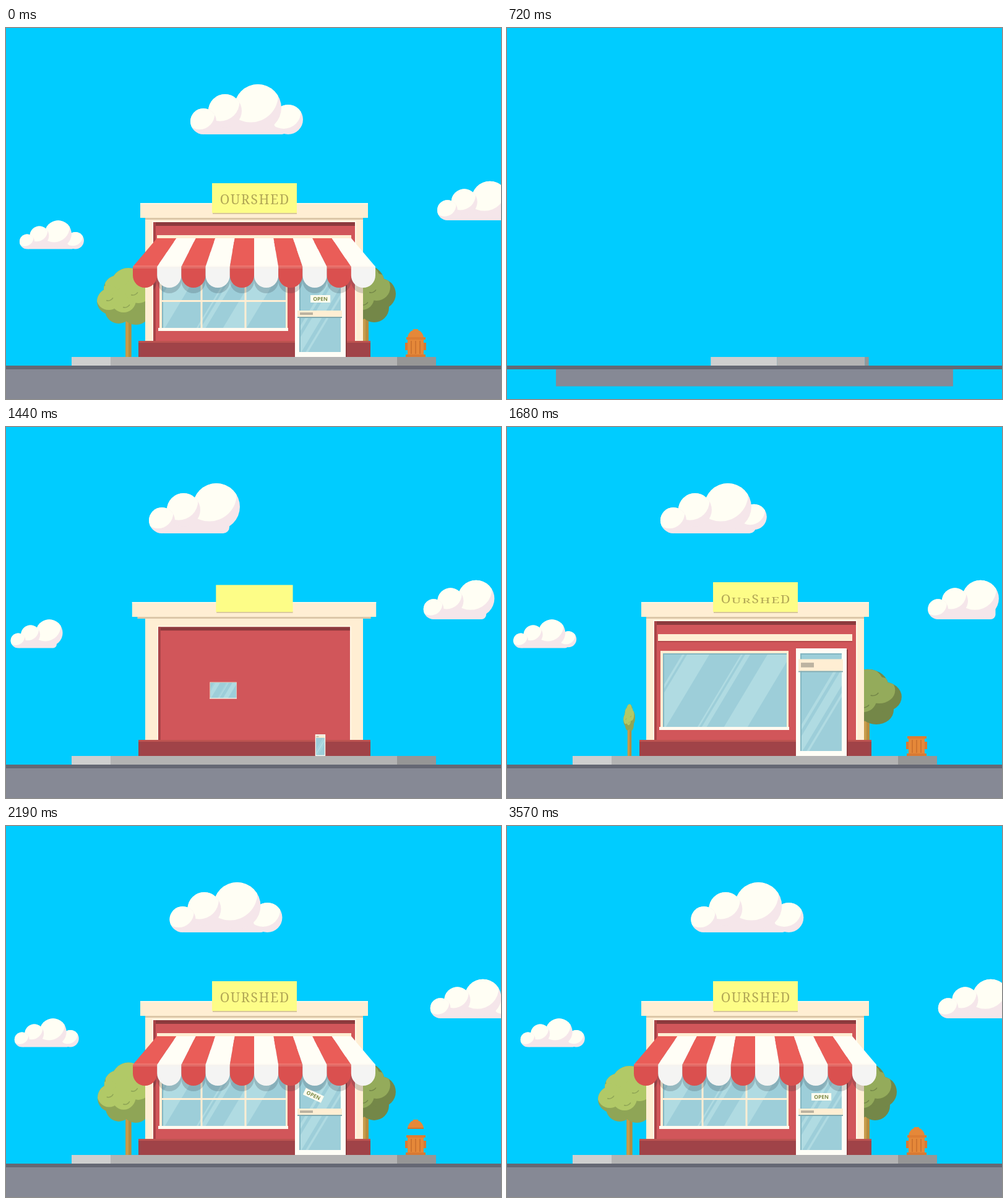
These frames come from a looping animation (800 px wide and 600 px high, 3.6 s). An HTML page with a canvas:

```html
<!DOCTYPE html>
<html lang="en">
<head>
<meta charset="utf-8">
<title>Little shop</title>
<style>
  html, body { margin: 0; width: 100%; height: 100%; overflow: hidden; background: #0cf; }
  canvas { display: block; }
</style>
</head>
<body>
<canvas id="stage" width="800" height="600"></canvas>
<script>
const LOOP = 3600, STEP = 30, NAME = 'OURSHED';
const g = document.getElementById('stage').getContext('2d');
const CREAM = '#ffeed3', RED = '#d1565a', GLASS = '#9dced9', ORANGE = '#e58839';
let t = 0;

// Timing and easing
const span = (a, b) => Math.min(1, Math.max(0, (t - a) / (b - a)));
const mix = (a, b, p) => a + (b - a) * p;
const out = u => 1 - (1 - u) ** 2;
const smooth = u => u * u * (3 - 2 * u);
const back = u => 1 + 2.7 * (u - 1) ** 3 + 1.7 * (u - 1) ** 2;
const ring = (start, period, decay) =>
  Math.exp(-(t - start) / decay) * Math.cos((t - start) / period * 2 * Math.PI);

// Drawing helpers
function box(x1, y1, x2, y2, color) {
  g.fillStyle = color;
  g.fillRect(x1, y1, x2 - x1, y2 - y1);
}
function poly(color, ...p) {
  g.fillStyle = color;
  g.beginPath();
  for (let i = 0; i < p.length; i += 2) g.lineTo(p[i], p[i + 1]);
  g.fill();
}
function disc(x, y, r, color) {
  g.fillStyle = color;
  g.beginPath();
  g.arc(x, y, Math.max(0, r), 0, 7);
  g.fill();
}
function saved(draw) {
  g.save();
  draw();
  g.restore();
}
function grow(x, y, sx, sy, draw) {
  if (sx <= 0 || sy <= 0) return;
  saved(() => {
    g.translate(x, y);
    g.scale(sx, sy);
    g.translate(-x, -y);
    draw();
  });
}
function clipBox(x1, y1, x2, y2) {
  g.beginPath();
  g.rect(x1, y1, x2 - x1, y2 - y1);
  g.clip();
}

const LOBES = [[21, -21, 21], [56, -38, 27], [109, -43, 38], [158, -24, 24]];

function cloud(x, y, size, drift, push, start, lastStart) {
  const starts = [start, start + 48, start + 98, lastStart];
  const left = x - drift * (LOOP - t) - push * Math.exp((1200 - t) / 203);
  const shown = [];
  let px = 21, py = -21;
  LOBES.forEach(([cx, cy, r], i) => {
    const p = out(span(starts[i], starts[i] + 250));
    if (!p) return;
    px = mix(px, cx, p);
    py = mix(py, cy, p);
    shown.push([px, py, r * p]);
  });
  const base = 109 * smooth(span(start + 120, start + 260))
    + 28 * out(span(lastStart, lastStart + 250));
  saved(() => {
    g.translate(left, y);
    g.scale(size, size);
    if (base) {
      g.fillStyle = '#f5e6ea';
      g.beginPath();
      g.roundRect(15, -30, base + 6, 30, 10);
      g.fill();
    }
    for (const [cx, cy, r] of shown.reverse()) saved(() => {
      disc(cx, cy, r, '#f5e6ea');
      g.clip();
      disc(cx - r * .3, cy - r * .55, r * 1.17, '#fffef4');
    });
  });
}

function ground() {
  const road = out(span(600, 940));
  box(400 - 552 * road, 551, 400 + 552 * road, 551 + 49 * road, '#868995');
  const line = smooth(span(60, 540));
  box(400 - 400 * line, 546, 400 + 400 * line, 552, '#656874');
  if (t < 640) return;
  const right = mix(400, 695, out(span(640, 846)));
  const joint2 = Math.min(right, mix(400, 632, out(span(640, 794))));
  const joint1 = Math.min(joint2, mix(450, 169, smooth(span(692, 900))));
  const left = Math.min(joint1, mix(400, 106, smooth(span(645, 880))));
  box(left, 532, joint1, 546, '#cfcfcf');
  box(joint1, 532, joint2, 546, '#b3b3b3');
  box(joint2, 532, right, 546, '#969696');
}

function foliage(x, y, light, dark, leaf) {
  const blob = (dx, dy, r, c) => disc(x + dx, y + dy, r, c);
  const crown = [[0, -63, 29], [-18, -58, 22], [-30, -38, 21], [-16, -24, 22], [12, -24, 24], [22, -46, 25]];
  for (const [dx, dy, r] of crown) blob(dx, dy, r, dark);
  saved(() => {
    g.beginPath();
    for (const [dx, dy, r] of crown) {
      g.moveTo(x + dx + r, y + dy);
      g.arc(x + dx, y + dy, r, 0, 7);
    }
    g.clip();
    blob(-8, -67, 30, light);
    blob(-32, -44, 20, light);
    blob(-8, -40, 20, light);
    blob(16, -57, 22, light);
  });
  g.strokeStyle = leaf;
  g.lineWidth = 1.5;
  for (const [dx, dy] of [[-33, -48], [-6, -37], [7, -57]]) {
    g.beginPath();
    g.arc(x + dx, y + dy, 9, .5, 1.9);
    g.stroke();
  }
}

function trees() {
  const up = out(span(1440, 1620));
  const sway = t > 1620 ? ring(1680, 380, 130) : 0;
  grow(582, 532, up, up, () => {
    box(577, 465, 586, 532, '#b58d3f');
    box(577, 465, 581, 532, '#c79c4b');
    saved(() => {
      g.translate(0, 5 * sway);
      grow(584, 476, 1 + .17 * sway, 1 - .03 * sway,
        () => foliage(583, 476, '#94ab5b', '#748748', '#748748'));
    });
  });

  const open = smooth(span(1600, 2000)), pop = out(span(1560, 1660));
  const bounce = t > 2000 ? .06 * ring(2190, 440, 200) : 0;
  grow(198, 532, pop, pop, () => {
    const half = mix(3, 4.7, open);
    box(198 - half, 470, 198 + half, 532, '#b58d3f');
    box(198 - half, 470, 198, 532, '#c79c4b');
    const base = mix(493, 480, open);
    saved(() => {
      g.translate(0, base - 480);
      grow(198, 480, mix(.1, 1, open) - bounce * .3, mix(.41, 1, open) + bounce,
        () => foliage(198, 480, '#b1c967', '#8fa556', '#8fa556'));
    });
  });
}

function hydrant() {
  const lift = span(2090, 2310);
  if (lift > 0) saved(() => {
    g.translate(0, 14 * (1 - lift) - 20 * Math.sin(Math.PI * lift));
    g.fillStyle = ORANGE;
    g.beginPath();
    g.ellipse(662, 502, 13, 14, 0, Math.PI, 0);
    g.fill();
    box(658, 487, 666, 492, ORANGE);
    box(649, 500, 675, 502, '#cf742f');
  });
  const up = back(span(1540, 1680));
  grow(662, 532, up, up, () => {
    box(649, 501, 675, 530, ORANGE);
    box(647, 500, 678, 504, '#dd7d33');
    box(645, 509, 679, 521, '#d97a33');
    box(649, 505, 675, 528, ORANGE);
    for (const x of [654, 661, 668]) box(x, 506, x + 2, 527, '#cf742f');
    box(646, 528, 678, 532, '#d97a33');
  });
}

function shine(x1, y1, x2, y2, bands) {
  saved(() => {
    clipBox(x1, y1, x2, y2);
    const lean = (y2 - y1) * .6;
    for (const [x, w] of bands)
      poly('#b0dbe2', x, y1, x + w, y1, x + w - lean, y2, x - lean, y2);
  });
}

function walls() {
  const base = back(span(960, 1270));
  const h = back(span(1160, 1400)), w = 1 + .19 * (1 - h);
  if (t > 1160) grow(401, 507, w, h, () => box(225, 308, 577, 507, CREAM));

  const inner = out(span(1300, 1480));
  grow(401, 506, inner, inner, () => {
    box(236, 312, 566, 506, '#fff8e8');
    box(238, 314, 564, 506, RED);
    box(238, 314, 564, 320, '#8c3a3d');
    box(238, 314, 242, 506, '#a94347');
  });
  if (t > 960) grow(401, 532, base, Math.min(1, base * 5), () => {
    box(214, 506, 589, 532, '#a04348');
    box(214, 506, 589, 509, '#bd5350');
  });
  const roof = t > 1280 ? back(span(1280, 1500)) : 0;
  grow(401, 307, roof, Math.min(1, roof), () => {
    box(225, 307, 577, 310, '#dcc7a8');
    box(217, 283, 585, 307, CREAM);
    box(217, 283, 585, 285, '#fff6e4');
  });
}

function shopWindow() {
  const up = t > 1430 ? back(span(1430, 1640)) : 0;
  grow(351, 426, up, up, () => {
    box(248, 362, 455, 489, CREAM);
    box(252, 366, 452, 485, '#83b6c1');
    box(254, 368, 452, 485, GLASS);
    shine(254, 368, 452, 485, [[283, 4], [291, 36], [378, 3], [385, 8], [421, 38]]);
    const bar = out(span(1750, 1900));
    for (const x of [316, 387]) box(x - 1.5, 366, x + 1.5, 366 + 119 * bar, CREAM);
    box(252, 440, 252 + 200 * bar, 443, CREAM);
    box(246, 485, 456, 490, '#fffaf0');
  });
}

function door() {
  const up = t > 1430 ? back(span(1430, 1650)) : 0;
  grow(508, 532, Math.min(1, up), up, () => {
    box(549, 360, 551, 532, '#8c3a3d');
    box(467, 358, 549, 532, '#fffdf6');
    box(474, 366, 541, 524, '#83b6c1');
    box(476, 368, 541, 524, GLASS);
    shine(476, 368, 541, 524, [[544, 5], [555, 16], [578, 4]]);
    const slide = smooth(span(1620, 1920));
    const y = 366 + 91 * slide, h = mix(20, 10, slide);
    box(471, y + h, 543, y + h + 2, '#83aab0');
    box(471, y, 543, y + h, CREAM);
    box(475, y + h * .3, 496, y + h * .7, '#bcb3a1');
  });
}

function openSign() {
  const pop = out(span(2010, 2110));
  if (pop) saved(() => {
    g.translate(508, 412);
    g.rotate(.44 * ring(2190, 420, 344));
    g.scale(pop, pop);
    box(-16, 20, 16, 32, '#fffdf0');
    g.fillStyle = '#7b8a45';
    g.font = 'bold 8.5px "Noto Sans", sans-serif';
    g.textAlign = 'center';
    g.fillText('OPEN', 0, 29.2);
  });
}

function awning() {
  const rail = out(span(1500, 1640));
  box(401 - 157 * rail, 335, 401 + 157 * rail, 346, CREAM);
  if (rail) box(401 - 157 * rail, 346, 401 + 157 * rail, 348, '#b5484c');
  if (t <= 1740) return;
  const p = back(span(1740, 2040));
  const half = mix(157, 196, p), w = half / 5, top = 340, edge = top + 46 * p;
  const scallop = (i, dy, color) => {
    const x = 401 - half + i * w, y = edge + 14 * p + dy;
    g.fillStyle = color;
    g.beginPath();
    g.moveTo(x, edge);
    g.lineTo(x, y);
    g.ellipse(x + w / 2, y, w / 2, Math.max(0, 20 * p), 0, Math.PI, 0, true);
    g.lineTo(x + w, edge);
    g.fill();
  };
  saved(() => {
    clipBox(238, 340, 577, 440);
    for (let i = 0; i < 10; i++) scallop(i, 9 * p, 'rgba(40,50,60,.2)');
  });
  for (let i = 0; i < 10; i++) {
    const a = 244 + i * 31.4, b = 401 - half + i * w;
    scallop(i, 0, i % 2 ? '#f4f4f3' : '#da504f');
    poly(i % 2 ? '#fffef6' : '#ea5d58', a, top, a + 31.4, top, b + w, edge, b, edge);
  }
  box(401 - half, edge - 2, 401 + half, edge + 3, 'rgba(255,240,225,.16)');
  box(244, 337, 558, 340, CREAM);
}

function nameSign() {
  const up = t > 1380 ? back(span(1380, 1580)) : 0;
  grow(401, 299, up, up, () => {
    box(334, 298, 470, 301, '#d8c79c');
    box(333, 251, 470, 299, '#fdfd87');
  });
  const delays = [0, 60, 75, 0, 60, 55, 10], gap = 1.8;
  g.font = '21px "Noto Serif", serif';
  g.textAlign = 'left';
  const widths = [...NAME].map(c => g.measureText(c).width);
  let x = 401.5 - (widths.reduce((a, b) => a + b) + gap * 6) / 2;
  widths.forEach((w, i) => {
    const p = out(span(1560 + delays[i], 1720 + delays[i]));
    grow(x + w / 2, 285, 1, p, () => {
      g.fillStyle = '#b0a555';
      g.fillText(NAME[i], x, 285);
    });
    x += w + gap;
  });
}

function frame(now) {
  t = Math.floor(now % LOOP / STEP) * STEP || LOOP;
  box(0, 0, 800, 600, '#0cf');
  cloud(298, 172, 1, .0235, 53, 1000, 1523);
  cloud(22, 357.5, .571, .0058, 6, 952, 1485);
  cloud(697, 311, .78, .0079, 17, 1060, 1630);
  ground();
  trees();
  hydrant();
  walls();
  shopWindow();
  door();
  openSign();
  awning();
  nameSign();
  requestAnimationFrame(frame);
}
requestAnimationFrame(frame);
</script>
</body>
</html>
```
